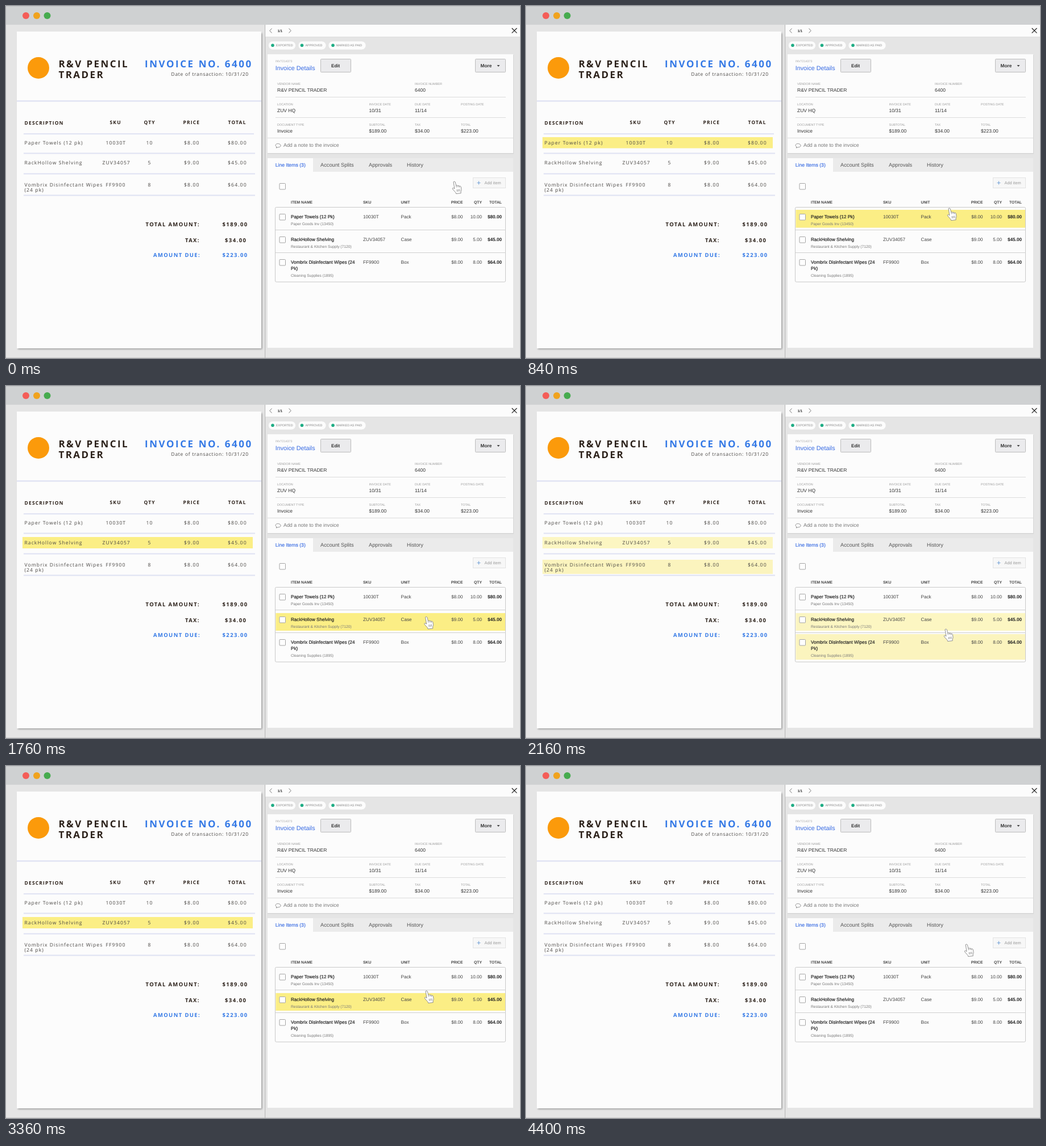
Write an HTML page that moves like this. It is 904 px wide and 620 px high and loops after 4440 ms.

```html
<!DOCTYPE html>
<html lang="en">
<head>
<meta charset="utf-8">
<title>Invoice line items</title>
<style>
html, body { margin: 0; width: 100%; height: 100%; overflow: hidden; background: #e5e5e5; }
svg { display: block; width: 904px; height: 620px; }
text { white-space: pre; text-rendering: geometricPrecision; }
.doc { font-family: "Open Sans", sans-serif; }
.app { font-family: "Liberation Sans", Arial, sans-serif; }
</style>
</head>
<body>
<svg id="stage" viewBox="0 0 904 620"></svg>
<script>
const stage = document.getElementById('stage');
const LOOP = 4440;

function add(tag, attrs, parent = stage) {
  const node = document.createElementNS('http://www.w3.org/2000/svg', tag);
  for (const key in attrs) node.setAttribute(key, attrs[key]);
  parent.appendChild(node);
  return node;
}
const rect = (x, y, width, height, fill, more = {}) => add('rect', { x, y, width, height, fill, ...more });
const circle = (cx, cy, r, fill) => add('circle', { cx, cy, r, fill });
const rule = (x1, x2, y, stroke, width = 1) =>
  add('line', { x1, x2, y1: y, y2: y, stroke, 'stroke-width': width });
const path = (d, stroke, width = 1, fill = 'none') =>
  add('path', { d, stroke, fill, 'stroke-width': width });

function label(cls, x, y, str, size, fill, more = {}) {
  add('text', { class: cls, x, y, 'font-size': size, fill, ...more }).textContent = str;
}
const bold = { 'font-weight': 700 };
const right = { 'text-anchor': 'end' };
const doc = (x, y, str, size = 8.6, spacing = 1.06, fill = '#4a4744', more = {}) =>
  label('doc', x, y, str, size, fill, { 'letter-spacing': spacing, ...more });
const app = (x, y, str, size = 8.25, fill = '#333', more = {}) =>
  label('app', x, y, str, size, fill, more);

function drawWindow() {
  rect(0, 0, 904, 620, '#e5e5e5');
  rect(0, 0, 904, 33, '#cfd1d2');
  rule(0, 904, .5, '#c2c4c5');
  rule(0, 904, 619.5, '#cdcdcd');
  circle(35, 17, 6, '#f45d58');
  circle(54, 17, 6, '#f0a31e');
  circle(72.5, 17, 6, '#46ab4e');

  const defs = add('defs', {});
  const blur = add('filter', { id: 'soft', x: '-5%', y: '-5%', width: '110%', height: '110%' }, defs);
  add('feGaussianBlur', { stdDeviation: 1.6 }, blur);
  rect(21, 48, 429.5, 556.5, '#999', { filter: 'url(#soft)' });
  rect(19, 45, 430, 558, '#fcfcfc');
  rect(455, 33, 1.2, 587, '#b9b9b9');
}

function drawPanels() {
  rect(456.2, 33, 448, 21, '#fcfcfc');
  rule(456, 904, 54.5, '#dedede');
  path('M467.5 39.5l-3.7 4 3.7 4M497.5 39.5l3.7 4-3.7 4', '#777');
  app(477.5, 46, '1/1', 6.2, '#333', bold);
  path('M889.7 39l8.8 8.6m0-8.6l-8.8 8.6', '#222', 1.2);

  for (const [x, w, dot, str] of [[461.5, 48, 469, 'EXPORTED'], [514, 49, 520.5, 'APPROVED'], [567, 66, 575, 'MARKED AS PAID']]) {
    rect(x, 62, w, 15, '#fcfcfc', { rx: 7.5, stroke: '#dedede', 'stroke-width': .5 });
    circle(dot, 69.3, 2.8, '#20ad85');
    app(dot + 6, 71.3, str, 5.4, '#858585');
  }

  rect(460, 86, 433, 174.5, '#d6d6d6');
  rect(460, 85, 432, 174, '#fcfcfc');
  rect(460, 268, 432, 334, '#fcfcfc');
  rect(540, 268, 352, 24, '#ebebeb');
}

// Light marker bars behind the invoice rows and the matching table rows.
function drawHighlights() {
  const bars = [[231, 19.5, 359, 31.5], [266, 20, 400, 31], [306, 25, 437, 45]];
  return bars.map(([docY, docH, appY, appH]) => {
    const group = add('g', { fill: '#fbee85', opacity: 0 });
    add('rect', { x: 29, y: docY, width: 405, height: docH }, group);
    add('rect', { x: 474.5, y: appY, width: 404, height: appH }, group);
    return group;
  });
}

function drawInvoice() {
  const dark = '#2b2019', blue = '#3479e6', line = '#dfe2f3';
  circle(57, 109, 19, '#fb9a0b');
  doc(92.5, 107.5, 'R&V PENCIL', 17, 2.4, dark, bold);
  doc(92.5, 127, 'TRADER', 17, 2.4, dark, bold);
  doc(244, 108, 'INVOICE NO. 6400', 17, 2.55, blue, bold);
  doc(290.5, 122.7, 'Date of transaction: 10/31/20', 8.5, .72);

  rule(19, 449, 167.3, line, 2.2);
  rule(31, 436, 225.3, line, 2);
  for (const y of [259.5, 295.5, 333.5]) rule(31, 438, y, line, 2);

  const heads = [[32.5, 'DESCRIPTION', 209], [182.5, 'SKU', 208.3], [242.5, 'QTY', 208.3], [311.5, 'PRICE', 208.3], [390.5, 'TOTAL', 208.3]];
  for (const [x, str, y] of heads) doc(x, y, str, 8.5, 1.17, dark, bold);

  const rows = [
    [243.8, 'Paper Towels (12 pk)', 175.5, '10030T', 246.5, '10', '$8.00', '$80.00'],
    [279.3, 'RackHollow Shelving', 169.5, 'ZUV34057', 249.5, '5', '$9.00', '$45.00'],
    [318.2, 'Vombrix Disinfectant Wipes', 175.5, 'FF9900', 249.5, '8', '$8.00', '$64.00']
  ];
  for (const [y, name, skuX, sku, qtyX, qty, price, total] of rows) {
    doc(32.5, y, name);
    doc(skuX, y, sku);
    doc(qtyX, y, qty);
    doc(313, y, price, 8.7, 1.1);
    doc(390, y, total, 8.7, 1.1);
  }
  doc(32.5, 327.2, '(24 pk)');

  const sums = [
    [387.6, 245.5, 'TOTAL AMOUNT:', 380.5, '$189.00', dark],
    [415.6, 315, 'TAX:', 385, '$34.00', dark],
    [441.6, 259, 'AMOUNT DUE:', 380.5, '$223.00', blue]
  ];
  for (const [y, x, name, valueX, value, fill] of sums) {
    doc(x, y, name, 9.5, 1.35, fill, bold);
    doc(valueX, y, value, 9.5, 1.42, fill, bold);
  }
}

function drawDetails() {
  app(474, 99.3, 'INV7214373', 5.3, '#a5a5a5');
  app(473.7, 112.7, 'Invoice Details', 10.75, '#3468e2');
  for (const x of [553.5, 825.5]) rect(x, 93.5, 53, 23, '#ebebed', { rx: 1, stroke: '#bcbcbc' });
  app(572, 108, 'Edit', 8.1, '#333', bold);
  app(834.5, 108, 'More', 8.3, '#333', bold);
  path('M863.5 104h5l-2.5 3z', 'none', 0, '#444');

  const fields = [
    [477, 138.6, 'VENDOR NAME', 'R&V PENCIL TRADER'], [719, 138.6, 'INVOICE NUMBER', '6400'],
    [477, 174.6, 'LOCATION', 'ZUV HQ'], [638.5, 174.6, 'INVOICE DATE', '10/31'],
    [719, 174.6, 'DUE DATE', '11/14'], [800, 174.6, 'POSTING DATE', ''],
    [477, 210.6, 'DOCUMENT TYPE', 'Invoice'], [638.5, 210.6, 'SUBTOTAL', '$189.00'],
    [719, 210.6, 'TAX', '$34.00'], [800, 210.6, 'TOTAL', '$223.00']
  ];
  for (const [x, y, name, value] of fields) {
    app(x, y, name, 5.5, '#9c9c9c');
    app(x, y + 12.6, value, 8.5);
  }
  rule(474, 879, 160.5, '#dcdcdc');
  rule(474, 879, 196.5, '#dcdcdc');
  rule(460, 892, 232.5, '#dcdcdc');
  path('M476 248l-.8 2 3-1.2c7 .4 6.2-6.3 .2-6.3-5 0-5.5 4-2.4 5.5z', '#888', .9);
  app(488, 248.3, 'Add a note to the invoice', 8.9, '#777');
}

function drawItems() {
  app(473.7, 283.3, 'Line Items (3)', 8.7, '#3468e2', { stroke: '#3468e2', 'stroke-width': .15 });
  app(553, 283.3, 'Account Splits', 9.25, '#555');
  app(638, 283.3, 'Approvals', 9.25, '#555');
  app(705, 283.3, 'History', 9.25, '#555');

  rect(821.5, 302.5, 57, 18, '#f7f7f7', { stroke: '#e3e3e3' });
  path('M828.5 311.5h6m-3-3v6', '#7ba7d9', 1.2);
  app(841.5, 314.3, 'Add item', 7.4, '#999');

  const heads = [[501, 'ITEM NAME'], [628, 'SKU'], [694.5, 'UNIT'], [803.5, 'PRICE', right], [837, 'QTY', right], [872, 'TOTAL', right]];
  for (const [x, str, anchor] of heads) app(x, 348, str, 6.8, '#444', { ...bold, ...anchor });

  rect(473.5, 354.5, 405, 131.5, 'none', { rx: 2, stroke: '#c9c9c9' });
  rule(474, 879, 394.5, '#d0d0d0');
  rule(474, 879, 434.5, '#d0d0d0');
  for (const y of [312.5, 366.5, 406.5, 446.5]) rect(481, y, 10.5, 10.5, '#fdfdfd', { rx: 1, stroke: '#a5a5a5' });

  const rows = [
    [373.8, ['Paper Towels (12 Pk)'], 'Paper Goods Inv (13450)', '10030T', 'Pack', '$8.00', '10.00', '$80.00'],
    [414, ['RackHollow Shelving'], 'Restaurant & Kitchen Supply (7120)', 'ZUV34057', 'Case', '$9.00', '5.00', '$45.00'],
    [454, ['Vombrix Disinfectant Wipes (24', 'Pk)'], 'Cleaning Supplies (1895)', 'FF9900', 'Box', '$8.00', '8.00', '$64.00']
  ];
  for (const [y, names, account, sku, unit, price, qty, total] of rows) {
    names.forEach((name, i) =>
      app(501, y + i * 11, name, 8.1, '#222', { stroke: '#222', 'stroke-width': .2 }));
    app(501, y + 1.2 + names.length * 11, account, 6.7, '#777');
    app(628, y, sku, 8.2, '#444');
    app(694.5, y, unit, 8.2, '#444');
    app(803.5, y, price, 8.1, '#444', right);
    app(837, y, qty, 8.1, '#444', right);
    app(872, y, total, 8.2, '#222', { ...bold, ...right });
  }
}

function drawHand() {
  const hand = add('g', { stroke: '#858585', 'stroke-width': .9, 'stroke-linejoin': 'round' });
  add('path', {
    fill: '#fff',
    d: 'M-6-9.2q1.6-1.8 3.2 .2l1.6 6.4q1.6-1.4 3 .2q1.5-1 2.6 .6q2-.6 2.8 1l.8 4.8q.2 2-1 4l.2 2.6-8.6 1-.6-2-5-5.6q-1.8-2.4 .4-2.8l2.6 1.6z'
  }, hand);
  add('path', { fill: 'none', d: 'M.2 4l.5 4m1.8-4.3l.5 4m1.8-4.3l.5 4M-1.2-2.6l.6 3M1.8-2.4l.4 2.6M4.4-1.8l.4 2.4' }, hand);
  return hand;
}

drawWindow();
drawPanels();
const highlights = drawHighlights();
drawInvoice();
drawDetails();
drawItems();
const hand = drawHand();

// Pointer stops: time, x, y. Travel between stops is linear.
const stops = [
  [0, 793, 319], [840, 749, 366], [1440, 744, 399], [2160, 743, 438], [2540, 743.5, 459],
  [2800, 744, 443], [3920, 744, 369], [3980, 745, 364], [4400, 779, 324], [LOOP, 783, 320]
];
const mix = (a, b, k) => a + (b - a) * k;
// Quick dissolve centred on the given time.
const ramp = (t, centre) => Math.min(1, Math.max(0, (t - centre) / 80 + .5));
const between = (t, start, end) => ramp(t, start) - ramp(t, end);

function draw(t) {
  const i = stops.findIndex(stop => stop[0] > t);
  const [t0, x0, y0] = stops[i - 1], [t1, x1, y1] = stops[i];
  const k = (t - t0) / (t1 - t0);
  hand.setAttribute('transform', `translate(${mix(x0, x1, k)} ${mix(y0, y1, k)})`);

  const levels = [
    between(t, 800, 1520) + between(t, 3440, 4000),
    between(t, 1520, 2160) + between(t, 2800, 3440),
    between(t, 2160, 2800)
  ];
  highlights.forEach((bar, n) => bar.setAttribute('opacity', levels[n]));
}

const start = performance.now();
function tick() {
  draw((performance.now() - start) % LOOP);
  requestAnimationFrame(tick);
}
tick();
</script>
</body>
</html>
```
